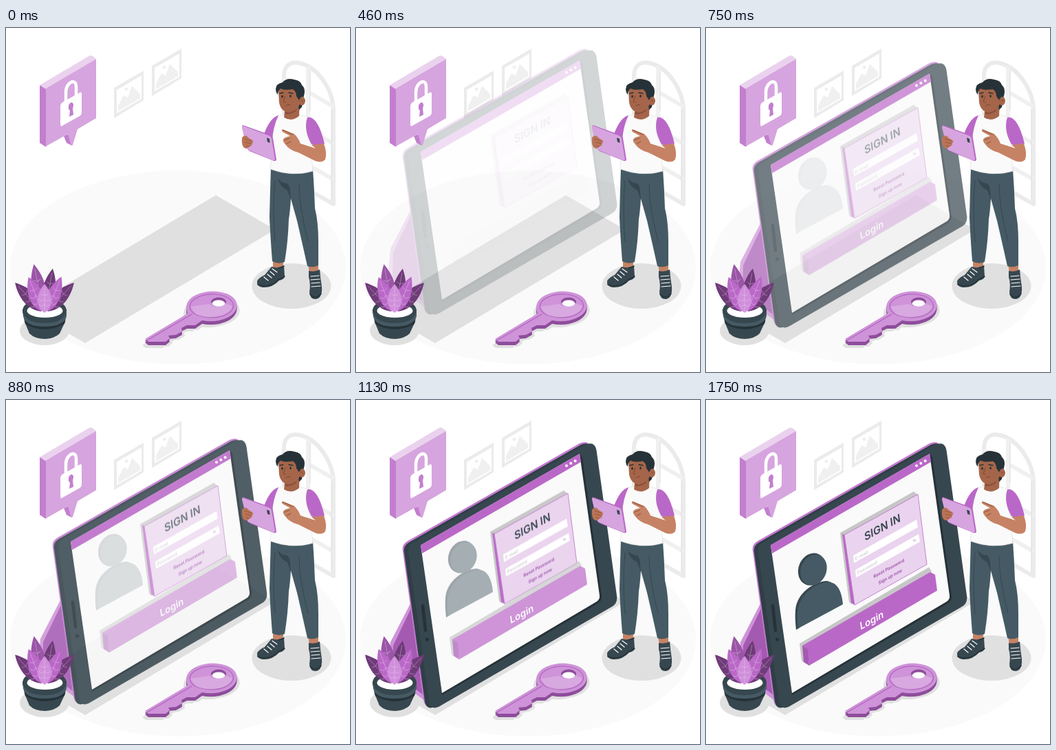
Recreate the animation shown at these times as an HTML page without scripts. Size 500 px wide and 500 px high, loop 1790 ms.

```html
<!DOCTYPE html>
<html lang="en">
<head>
<meta charset="utf-8">
<title>Sign in</title>
<style>
html, body { margin: 0; width: 100%; height: 100%; overflow: hidden; background: #fff; }
svg { display: block; width: 100vw; height: 100vh; }
text { font-family: Inter, Roboto, sans-serif; font-weight: 600; }
.mid { text-anchor: middle; }
.line { fill: none; stroke-linecap: round; stroke-linejoin: round; }
.drop { animation: 1790ms linear infinite; }
#tablet { animation-name: tablet; }
#form { animation-name: form; }
#login { animation-name: login; }
#avatar { animation-name: avatar; }
@keyframes tablet {
  0%, 7.5% { opacity: 0; transform: translateY(-40px); animation-timing-function: ease-in-out; }
  63%, 100% { opacity: 1; transform: none; }
}
@keyframes form {
  0%, 15% { opacity: 0; transform: translateY(-40px); animation-timing-function: ease-in-out; }
  71%, 100% { opacity: 1; transform: none; }
}
@keyframes login {
  0%, 25% { opacity: 0; transform: translateY(-40px); }
  35.2% { opacity: .14; transform: translateY(-34px); }
  49.2% { opacity: .44; transform: translateY(-19px); }
  63.1% { opacity: .7; transform: translateY(-9px); }
  77.1% { opacity: .92; transform: translateY(-2px); }
  87%, 100% { opacity: 1; transform: none; }
}
@keyframes avatar {
  0%, 36% { opacity: 0; transform: translateY(-40px); }
  49.2% { opacity: .18; transform: translateY(-28px); }
  63.1% { opacity: .47; transform: translateY(-18px); }
  77.1% { opacity: .7; transform: translateY(-10.5px); }
  97.5%, 100% { opacity: 1; transform: none; }
}
</style>
</head>
<body>
<svg viewBox="0 0 500 500">
<defs>
  <g id="frame">
    <path fill="#ebebeb" d="M157 87L200 62V105L157 131Z"/>
    <path fill="#fff" d="M161 90L197 69V103L161 124Z"/>
    <path fill="#f0f0f0" d="M163 121V113L171 98L177 101L183 84L195 96V102Z"/>
    <circle cx="175" cy="89" r="2.5" fill="#f0f0f0"/>
  </g>
  <path id="shell" d="M76 222Q74 212 83 207L333 65Q347 59 349.500 73L379 284Q381 296 371 301L120 446Q108 451 106 438Z"/>
  <path id="blade" fill-rule="evenodd" d="M202 452L264 415C254 391 286 381 306 383C330 385 340 398 334 410C327 423 305 429 285 425L275 432H263L255 436L256 441L247 446L236 447L238 451L232 456H207ZM298 398A11 6.500 0 1 0 320 398A11 6.500 0 1 0 298 398Z"/>
  <g id="leaf">
    <path d="M0 0C-14 -12 -13 -32 0 -50C13 -32 14 -12 0 0Z"/>
    <path class="line" stroke="#fff" stroke-opacity=".35" stroke-width=".8" d="M0 0V-44M-8 -14L-4 -11L0 -14L4 -11L8 -14M-8 -23L-4 -20L0 -23L4 -20L8 -23M-5 -32L0 -30L5 -32"/>
  </g>
</defs>

<!-- floor -->
<ellipse cx="250" cy="348" rx="244" ry="141" fill="#fafafa"/>
<path fill="#e0e0e0" d="M305 243L391 293L115 458L29 408Z"/>
<ellipse cx="56" cy="440" rx="36" ry="21" fill="#e0e0e0"/>
<ellipse cx="415" cy="375" rx="57.500" ry="33" fill="#e0e0e0"/>

<!-- wall -->
<use href="#frame"/>
<use href="#frame" x="55" y="-32"/>
<g class="line" stroke="#ebebeb">
  <path fill="#fff" stroke-width="6" stroke-linecap="butt" d="M404 190V68C405 54 414 48 427 51C454 57 476 91 476 120V256L404 215"/>
  <path stroke="#f0f0f0" stroke-width="6" d="M439 58V225M406 74L474 113M406 128L474 167M406 180L474 219"/>
  <path stroke="#e0e0e0" stroke-width="1.200" d="M442 62V120M473 118V250"/>
</g>

<!-- tablet -->
<g id="tablet" class="drop">
  <path fill="#ce93d8" d="M79 296L50 352L46 397L104 440Z"/>
  <path fill="#a55ab2" d="M80 303L54 357L53 396L97 428Z"/>
  <use href="#shell" x="-8" y="-2" fill="#c27acf"/>
  <use href="#shell" x="-6" fill="#303e46"/>
  <use href="#shell" fill="#37474f"/>
  <path fill="#263238" d="M94 211L325 77L329 83L357 284Q358 292 351 296L125 429Z"/>
  <path fill="#fafafa" d="M94 211L325 78L354 284Q355 290 349 293.500L125 426Z"/>
  <path fill="#ba68c8" d="M94 211L325 78L327 90L96 223Z"/>
  <g fill="#fff"><circle cx="306" cy="95.500" r="2"/><circle cx="312.300" cy="92" r="2"/><circle cx="318.600" cy="88.500" r="2"/></g>
  <path class="line" stroke="#263238" stroke-width="4.500" d="M97 299L101 335"/>
  <circle cx="103.500" cy="348" r="2.600" fill="#263238"/>
</g>

<g id="form" class="drop">
  <path fill="#c7c7c7" d="M195 193L302 133L307 137L212 297L208 294Z"/>
  <path fill="#ba68c8" d="M198 194L201 196L216 298L211 295Z"/>
  <path fill="#ead3ee" stroke="#ba68c8" stroke-width=".8" d="M201 196L308 137L321 239L216 298Z"/>
  <path fill="#fff" d="M214 226L306 174L308 185L215 237ZM217 247L309 195L311 206L218 258Z"/>
  <ellipse cx="303" cy="204" rx="2.600" ry="2" fill="#e6d5e9"/>
  <text class="mid" font-size="16" fill="#37474f" transform="matrix(.876 -.483 .13 .99 257 190.500)">SIGN IN</text>
  <g font-size="7" fill="#d6d0d8" style="font-weight:400">
    <text transform="matrix(.876 -.49 .13 .99 217 233.500)">E-mail</text>
    <text transform="matrix(.876 -.49 .13 .99 220 254)">Password</text>
  </g>
  <g class="mid" font-size="6.600" fill="#9c4fab">
    <text transform="matrix(.876 -.483 .13 .99 266 247)">Reset Password</text>
    <text transform="matrix(.876 -.483 .13 .99 268 259)">Sign up now</text>
  </g>
</g>

<g id="login" class="drop">
  <path fill="#c7c7c7" d="M136 354L324 243L328 249L143 358V382L139 379Z"/>
  <path fill="#ba68c8" d="M140 357L326 250L333 254L336 277L150 386L147 362Z"/>
  <path fill="#a55ab2" d="M140 357L148 362L150 386L142 381Z"/>
  <text class="mid" font-size="14.500" fill="#fff" transform="matrix(.876 -.483 .13 .99 241.500 325)">Login</text>
</g>

<g id="avatar" class="drop">
  <g fill="#37474f">
    <ellipse cx="154" cy="246" rx="19.500" ry="24" transform="rotate(22 154 246)"/>
    <path d="M131 334Q129 318 130 305C132 281 156 264 176 263L182 265L136 331Z"/>
  </g>
  <g fill="#455a64">
    <ellipse cx="156.500" cy="247" rx="18.500" ry="23" transform="rotate(22 156.500 247)"/>
    <path d="M134 332Q132 318 133 307C136 283 158 266 178 264.500C190 265 197 276 199 297Z"/>
  </g>
</g>

<!-- lock -->
<path fill="#c27fce" d="M49 83L59 87V172Q57 173 55 171L49 167ZM84 157L88 167L96 171L94 153Z"/>
<path fill="#ead2ee" d="M49 83L120 41Q123 39 126 41L131 45L58 89Z"/>
<path fill="#d6a4de" d="M58 88L131 45V131L104 147L97 170Q95 172 94 168L90 154L58 172Z"/>
<path fill="#fff" d="M79 113Q79 110 82 108L107 94Q110 92 110 96V123Q110 126 107 128L82 142Q79 144 79 140Z"/>
<path class="line" stroke="#fff" stroke-width="4.500" d="M87 108V93C87 85 92 79 97 78C101 78 102 82 102 86V99"/>
<path fill="#c27fce" d="M91 118Q90 110 95 108Q100 109 97 117L98 126L92 129L93 120Z"/>

<!-- key -->
<g id="key">
  <use href="#blade" x="-4" y="9" fill="#e0e0e0"/>
  <use href="#blade" x="4" y="7" fill="#e0e0e0"/>
  <use href="#blade" y="5" fill="#8e4d9b"/>
  <use href="#blade" y="2.500" fill="#8e4d9b"/>
  <use href="#blade" fill="#ce93d8"/>
  <ellipse cx="309" cy="400" rx="9" ry="4.500" fill="#fff"/>
  <path class="line" stroke="#b163bf" stroke-width="1.200" d="M205 454L270 416M268 409C263 394 286 386 304 387C326 389 334 400 329 409C322 420 300 424 280 418Q271 415 268 409Z"/>
  <path fill="#fff" fill-opacity=".2" d="M268 405L295 401Q303 408 320 401L329 404C325 420 292 425 276 416Z"/>
</g>

<!-- plant -->
<path fill="#37474f" d="M24 409L27 427L34 444Q42 452 57 452Q71 451 78 444L86 427L88 409Z"/>
<path fill="#263238" d="M27 424Q55 442 86 424L85 430Q56 446 28 430Z"/>
<ellipse cx="56" cy="411" rx="32" ry="18" fill="#37474f"/>
<path fill="#455a64" d="M24 411Q28 429 56 429Q84 429 88 411V419Q84 434 56 434Q28 434 25 419Z"/>
<ellipse cx="56.500" cy="411" rx="26" ry="10" fill="#fff"/>
<use href="#leaf" fill="#9b55a7" transform="translate(53 407) rotate(-11) scale(1 1.300)"/>
<use href="#leaf" fill="#6f3b79" transform="translate(58 406) rotate(10) scale(.9 1.140)"/>
<use href="#leaf" fill="#6f3b79" transform="translate(52 412) rotate(-43) scale(.95 1.140)"/>
<use href="#leaf" fill="#6f3b79" transform="translate(60 412) rotate(43) scale(.95 1.140)"/>
<use href="#leaf" fill="#ba68c8" transform="translate(52 412) rotate(-21) scale(1 1.070)"/>
<use href="#leaf" fill="#ba68c8" transform="translate(60 412) rotate(22) scale(.95 1.090)"/>
<use href="#leaf" fill="#d08fdb" transform="translate(56 414) scale(1 .84)"/>

<!-- person -->
<g id="person">
  <path fill="#c68264" d="M388 336H404L402 350H388ZM439 343H454L454 356H441Z"/>
  <path fill="#37474f" d="M386 347Q396 350 404 345L405 361Q405 365 397 367Q387 378 373 377Q364 376 365 368Q367 363 376 359ZM440 353Q449 355 456 351Q457 364 459 376Q460 392 451 394Q442 395 441 384Q443 372 440 362Z"/>
  <path class="line" stroke="#263238" stroke-width="1.500" d="M366 373Q384 379 396 366L405 361M442 387Q450 396 458 386M397 349L404 346"/>
  <path class="line" stroke="#fff" stroke-width="1.200" d="M375 362L381 367M380 358L386 363M384 354L390 359M387 350L394 355M443 361L455 360M443 366L456 365M444 371L456 370M444 376L457 375"/>
  <path fill="#455a64" d="M385 203L446 205Q448 232 449 262Q454 282 454 310V345Q446 349 438 346Q430 310 423 280Q418 262 414 248Q413 266 411 278Q410 310 405 340Q396 344 387 339Q384 300 383 275Q384 235 385 203Z"/>
  <path fill="#37474f" d="M395 218Q399 225 409 226Q413 230 413 238L414 250L409 236Q397 230 395 218Z"/>
  <path class="line" stroke="#37474f" stroke-width="1" d="M391 222Q387 260 391 310M426 226Q426 260 439 310"/>
  <path fill="#fafafa" stroke="#e0e0e0" stroke-width=".7" d="M396 127Q415 122 438 129Q443 150 443 175L446 208Q416 217 384 205Q387 180 386 160Q388 140 396 127Z"/>
  <path fill="#ba68c8" d="M396 127Q384 130 375 154L387 164Q388 144 396 127ZM438 130Q453 127 463 168Q452 173 444 169Q432 148 438 130Z"/>
  <path fill="#c68264" d="M444 170L462 168Q467 182 464 191Q459 197 449 193L425 181Q412 178 405 168Q400 162 406 159L413 157L402 151Q399 147 404 148L419 154Q425 160 428 168L450 175Z"/>
  <path class="line" stroke="#8d5138" stroke-width="1" d="M402 148L417 155M405 163L412 160M408 168L414 165"/>

  <path fill="#ba68c8" d="M344 141L383 155Q387 156 388 160L393 191Q393 194 389 193L354 179Q351 177 350 174L343 144Z"/>
  <path fill="#d6a4de" d="M344 142L381 156Q385 157 386 161L391 191Q390 193 387 192L354 178Q351 177 350 174L343 144Z"/>
  <path fill="#37474f" d="M379 159.500L383 161L383.500 167L380 165.500Z"/>
  <path fill="#b97457" d="M343 160Q345 155 350 157L353 160L358 163Q361 166 357 168Q359 171 354 172Q351 177 346 174Q342 170 343 160Z"/>
  <path class="line" stroke="#8d5138" stroke-width=".8" d="M347 161L356 164M348 166L357 168M349 171L354 172"/>

  <path fill="#a5654a" d="M406 112L427 106L426 128Q415 137 404 130Z"/>
  <path fill="#8a4f38" d="M406 121Q418 121 424 114L421 121Q414 126 406 125Z"/>
  <path fill="#263238" d="M422 95L433 98L430 115L426 119Z"/>
  <path fill="#a5654a" d="M396 92Q397 84 410 84L426 92L428 108Q424 121 411 123Q399 121 397 108Z"/>
  <ellipse cx="430" cy="106" rx="5" ry="6.500" fill="#a5654a"/>
  <path fill="#263238" d="M393 94Q389 82 402 79Q408 72 419 75Q428 76 430 83Q436 88 433 99Q428 99 426 105L422 99Q422 92 417 89Q404 91 399 88Q395 91 395 97Z"/>
  <g fill="#263238"><ellipse cx="401.500" cy="99.500" rx="1.300" ry="2"/><ellipse cx="413.500" cy="99" rx="1.300" ry="2"/></g>
  <path class="line" stroke="#263238" stroke-width="1.300" d="M398 95L403 94M411 94L417 95"/>
  <path class="line" stroke="#804630" stroke-width="1" d="M406 99L403 107L406 108M407 113Q410 110 413 112M429 104L432 107"/>
</g>
</svg>
</body>
</html>
```
